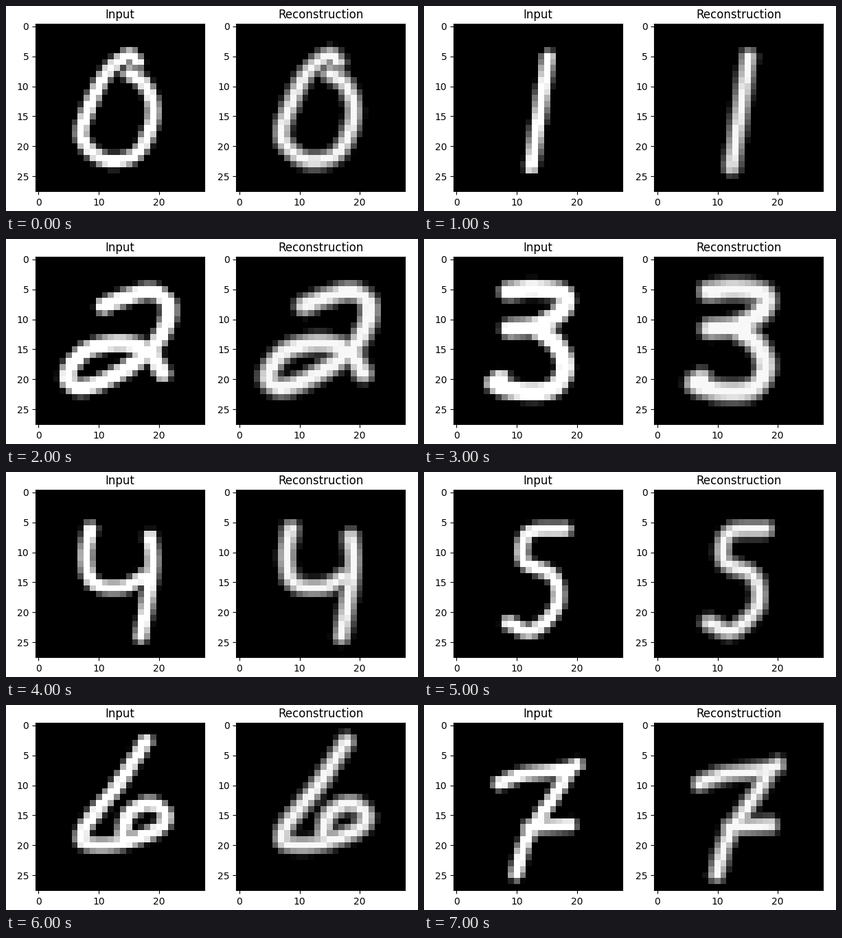
Recreate the animation shown at these times as a matplotlib script. Size 600 by 300 pixels, loop 8000 ms.

```python
import numpy as np
import matplotlib.pyplot as plt
from matplotlib.animation import FuncAnimation

W, H, DPI = 600, 300, 100
N = 28
SIDE, TOP = 245.6, 25.5
GY, GX = np.mgrid[0:N, 0:N, 0:1][:2]


def curve(points, steps=30):
    """Catmull-Rom curve through the given points."""
    p = np.array(points, float)
    p = np.vstack([2 * p[0] - p[1], p, 2 * p[-1] - p[-2]])
    t = np.linspace(0, 1, steps)[:, None]
    return np.vstack([
        0.5 * (2 * b + (c - a) * t + (2 * a - 5 * b + 4 * c - d) * t ** 2
               + (3 * b - a - 3 * c + d) * t ** 3)
        for a, b, c, d in zip(p, p[1:], p[2:], p[3:])])


def digit(radius, *strokes):
    """Crisp and blurred pictures of one pen drawing."""
    path = np.vstack([curve(s) for s in strokes])
    dist = np.hypot(GX - path[:, 0], GY - path[:, 1]).min(axis=2)
    crisp = np.clip((radius - dist) / 1.1 + 0.5, 0, 1)
    soft = 0.97 * np.clip((radius + 0.1 - dist) / 1.7 + 0.5, 0, 1)
    return crisp, soft


zero = digit(1.1, [(16.4, 6), (14.8, 4.9), (11.3, 7.8), (8.6, 13), (7.2, 18.5),
                   (11, 22.3), (16.3, 21.2), (19, 15), (17.8, 10), (15, 7.9)])
one = digit(1.1, [(15.2, 5.2), (12.4, 23.4)])
two = digit(1.35, [(10.8, 7.8), (15, 6.2), (19, 5.5), (21.6, 7.8),
                   (20.6, 12.2), (17.6, 16), (12, 19.7), (7, 21.4),
                   (4.8, 19.5), (7.5, 15.5), (13, 14), (18, 15.2),
                   (20.6, 19)])
three = digit(1.5,
              [(8.6, 5.4), (13, 5), (17.7, 5.8), (17.5, 8.5), (13.5, 11),
               (8.8, 11.6)],
              [(13, 11.5), (16.4, 14), (18, 18), (15.8, 21.6), (10.5, 22),
               (6.4, 20.8), (7.4, 20)])
four = digit(1.1,
             [(8.6, 6.1), (7.9, 11), (9.2, 15.2), (14, 15.8), (17.5, 14)],
             [(18.5, 7.5), (18.9, 12), (17.9, 19), (17, 24)])
five = digit(1.1, [(18, 6.2), (12, 6.8), (11.2, 11.5), (16, 14), (16.6, 19),
                   (12.5, 23.1), (8.6, 21.8)])
six = digit(1.15, [(17.8, 2.7), (12.9, 10.3), (8.2, 16.2), (7.5, 19.5),
                   (13, 19.8), (19.5, 17.5), (21.1, 15), (18.5, 13.1),
                   (15, 14.7), (14, 18)])
seven = digit(1.1,
              [(7.1, 9.7), (11, 8.3), (18, 7.4), (20, 6.6)],
              [(19, 7), (16.5, 11.3), (11.8, 18.6), (9.9, 24.8)],
              [(12, 17), (18.8, 16.6)])

digits = [zero, one, two, three, four, five, six, seven]

fig = plt.figure(figsize=(W / DPI, H / DPI), dpi=DPI, facecolor="white")


def panel(left, title):
    ax = fig.add_axes([left / W, (H - TOP - SIDE) / H, SIDE / W, SIDE / H])
    ax.set_title(title, pad=5.5)
    im = ax.imshow(np.zeros((N, N)), cmap="gray", vmin=0, vmax=1,
                   interpolation="nearest", aspect="auto")
    ax.set_xticks(range(0, N, 10))
    ax.set_yticks(range(0, N, 5))
    return im


panels = [panel(43, "Input"), panel(335.4, "Reconstruction")]


def update(i):
    for im, picture in zip(panels, digits[i]):
        im.set_data(picture)
    return panels


anim = FuncAnimation(fig, update, frames=len(digits), interval=1000,
                     repeat=True, repeat_delay=0, blit=False)
plt.show()
```
